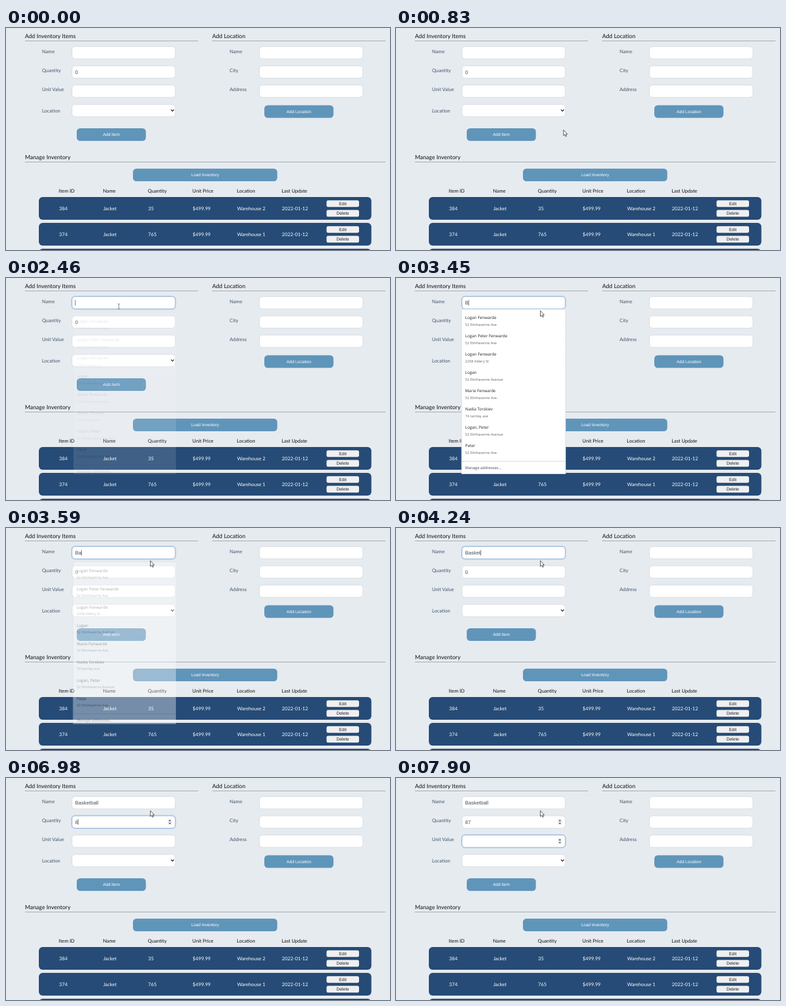
An HTML page for the animation above (8000 ms loop, 608x352 px).

```html
<!DOCTYPE html>
<html lang="en">
<head>
<meta charset="utf-8">
<title>Inventory form</title>
<style>
html, body { margin: 0; width: 100%; height: 100%; overflow: hidden; background: #e6ebf0; }
svg { display: block; text-rendering: geometricPrecision; }
text { font: 7.7px Lato, sans-serif; fill: #111; white-space: pre; }
.head { font-size: 9.05px; }
.label { fill: #45566a; }
.cell { fill: #fff; }
.value { font: 8px "Liberation Sans", Arial, sans-serif; fill: #454d55; }
.btn { font: 6.65px "Liberation Sans", Arial, sans-serif; fill: #fff; text-anchor: middle; }
.small { font: 6.9px "Liberation Sans", Arial, sans-serif; fill: #222; text-anchor: middle; }
.person { font: 6.4px "Open Sans", sans-serif; fill: #222; }
.street { font: 5.6px "Open Sans", sans-serif; fill: #666; }
.manage { font: 6px "Open Sans", sans-serif; fill: #444; }
</style>
</head>
<body>
<svg id="stage" width="608" height="352" viewBox="0 0 608 352"></svg>
<script>
const text = (cls, x, y, s, id = '') => `<text class="${cls}" x="${x}" y="${y}" id="${id}">${s}</text>`;
const box = (x, y, w, h, r, fill, more = '') =>
  `<rect x="${x}" y="${y}" width="${w}" height="${h}" rx="${r}" fill="${fill}" ${more}/>`;
const rule = (x1, x2, y) => `<path d="M${x1} ${y}H${x2}" stroke="#a6abb0"/>`;
const field = (x, y, w) => box(x, y, w, 19.5, 5, '#fff', 'stroke="#d3d9df" stroke-width=".8"');
const button = (x, y, w, s) => box(x, y, w, 20, 5.5, '#6095ba') + text('btn', x + w / 2, y + 12.4, s);
const small = (y, s) => box(507.5, y, 51.5, 10.6, 2.8, '#f0f0f0') + text('small', 533.2, y + 7.6, s);
const spinner = (id, y) => `<g id="${id}">` + box(256, y - 5, 7, 10, 0, '#f0f0f0') +
  `<path d="M257.4 ${y - 1.2}l2-2.4 2 2.4zM257.4 ${y + 1.2}l2 2.4 2-2.4z" fill="#555"/></g>`;

const rowY = [29.4, 60, 90.5, 121.2];
const columns = [84, 154, 225, 295.5, 366, 436.8];

function row(y, cells) {
  return box(52, y, 526.5, 36, 6, '#264b76') +
    cells.map((s, i) => text('cell', columns[i], y + 21, s)).join('') +
    small(y + 5.2, 'Edit') + small(y + 20.6, 'Delete');
}

function form(x, names, fieldX, w, labelY) {
  return names.map((s, i) => text('label', x, labelY[i], s) + field(fieldX, rowY[i], w)).join('');
}

const people = [
  ['Logan Fenwarde', '52 Elmhaverne Ave'],
  ['Logan Peter Fenwarde', '52 Elmhaverne Ave'],
  ['Logan Fenwarde', '2208 Aldery St'],
  ['Logan', '52 Elmhaverne Avenue'],
  ['Marie Fenwarde', '52 Elmhaverne Ave.'],
  ['Nadia Torskiev', '74 tarnley ave'],
  ['Logan, Peter', '52 Elmhaverne Avenue'],
  ['Peter', '52 Elmhaverne Ave.']
];

const popup = `<svg x="103" y="49.5" width="166" height="261.5" viewBox="103 49.5 166 261.5"><g id="popup">` +
  box(103.9, 49.5, 164.6, 261, 0, '#fff', 'stroke="#d5dae0" stroke-width=".8"') +
  people.map(([name, street], i) =>
    text('person', 109.6, 65.4 + 29 * i, name) + text('street', 109.6, 76 + 29 * i, street)).join('') +
  '<path d="M104 290.5H268.5" stroke="#d5dbe3"/>' +
  text('manage', 109.6, 302.8, 'Manage addresses...') + '</g></svg>';

const stage = document.getElementById('stage');
stage.innerHTML = box(0, 0, 608, 352, 0, '#e6ebf0') +
  text('head', 30, 15.5, 'Add Inventory Items') + rule(30, 304, 20.5) +
  text('head', 326.5, 15.5, 'Add Location') + rule(326.5, 601, 20.5) +
  form(57, ['Name', 'Quantity', 'Unit Value', 'Location'], 104.5, 163.5, [39.5, 69.6, 100.1, 133.5]) +
  form(354, ['Name', 'City', 'Address'], 401.3, 163.8, [39.5, 69.6, 100.1]) +
  '<path d="M261.3 129.4l2.3 2.4 2.3-2.4" fill="none" stroke="#111" stroke-width="1.2"/>' +
  button(112, 159, 109.5, 'Add Item') + button(409, 122.5, 109.5, 'Add Location') +
  text('head', 30, 207.5, 'Manage Inventory') + rule(30, 601, 212.5) +
  button(201, 223, 228.5, 'Load Inventory') +
  ['Item ID', 'Name', 'Quantity', 'Unit Price', 'Location', 'Last Update']
    .map((s, i) => text('', columns[i] - .4, 261.3, s)).join('') +
  row(268, ['384', 'Jacket', '35', '$499.99', 'Warehouse 2', '2022-01-12']) +
  row(309, ['374', 'Jacket', '765', '$499.99', 'Warehouse 1', '2022-01-12']) +
  box(52, 350, 526.5, 36, 6, '#264b76') +
  '<g id="ring">' + box(103.8, 28.7, 164.9, 20.9, 5.7, 'none', 'stroke="#c3d6e9" stroke-width="1.6"') +
  box(104.5, 29.4, 163.5, 19.5, 5, '#fff', 'stroke="#93b4d6" stroke-width=".9"') + '</g>' +
  spinner('spinQty', 69.7) + spinner('spinUnit', 100.2) +
  box(109.4, 65, 4.8, 9, 0, '#3390f0', 'id="mark"') +
  text('value', 109.5, 41.6, '', 'name') + text('value', 109.5, 72.5, '0', 'qty') +
  '<path id="caret" stroke="#555" stroke-width=".8" d="M0 0v9"/>' +
  popup +
  '<path id="arrow" d="M0 0V9.2L2.1 7.3 3.5 10.4 4.9 9.8 3.6 6.8H6.2Z" fill="#fff" stroke="#333" stroke-width=".8"/>' +
  '<path id="beam" d="M-1.8-4H-.5L0-3.5.5-4H1.8M0-3.5V3.5M-1.8 4H-.5L0 3.5.5 4H1.8" fill="none" stroke="#666" stroke-width=".8"/>';

const el = id => document.getElementById(id);
const show = (id, on) => el(id).setAttribute('visibility', on ? 'visible' : 'hidden');
const move = (id, x, y) => el(id).setAttribute('transform', `translate(${x} ${y})`);
const ramp = (t, a, b) => Math.min(1, Math.max(0, (t - a) / (b - a)));

// time, x, y of the pointer
const path = [
  [510, 583, 344], [830, 265.5, 161.8], [1300, 116, 41], [1370, 121, 40], [1510, 149, 40],
  [1770, 150, 40.5], [1970, 160, 42.5], [2390, 160, 42.5], [2650, 228.6, 51.8]
];
const keys = [3450, 3590, 3720, 4040, 4170, 4240, 4570, 4710, 5240, 5370];
const FOCUS = 2170, TO_QTY = 5500, TO_UNIT = 7370;

function pointer(t) {
  const i = path.findIndex(p => p[0] > t);
  if (i < 0) return path[path.length - 1].slice(1);
  const [a, b] = [path[i - 1], path[i]], k = ramp(t, a[0], b[0]);
  return [a[1] + (b[1] - a[1]) * k, a[2] + (b[2] - a[2]) * k];
}

function drawPointer(t) {
  if (t < 510) { show('arrow', false); show('beam', false); return; }
  const [x, y] = pointer(t);
  const over = x > 104 && x < 268 && rowY.slice(0, 3).some(top => y > top && y < top + 19.5);
  show('arrow', !over);
  show('beam', over);
  move(over ? 'beam' : 'arrow', x, y);
}

function draw(t) {
  const focus = t < FOCUS ? -1 : t < TO_QTY ? 0 : t < TO_UNIT ? 1 : 2;
  const typed = keys.filter(k => k <= t).length;
  el('name').textContent = 'Basketball'.slice(0, typed);

  const selected = focus === 1 && t < 6980;
  el('qty').textContent = t < 6980 ? '0' : t < 7100 ? '8' : '87';
  el('qty').style.fill = selected ? '#fff' : '';
  show('mark', selected);
  show('spinQty', focus > 0);
  show('spinUnit', focus === 2);

  show('ring', focus >= 0);
  move('ring', 0, focus > 0 ? rowY[focus] - rowY[0] : 0);

  const blinkOff = t >= 2920 && t < 3450 || t >= 7900;
  show('caret', focus >= 0 && !selected && !blinkOff);
  const width = focus === 0 ? el('name').getComputedTextLength()
    : focus === 1 ? el('qty').getComputedTextLength() : 0;
  move('caret', 109.7 + width, [34.8, 65, 95.5][Math.max(0, focus)]);

  const alpha = ramp(t, 2440, 2620) * (1 - ramp(t, 3470, 3660));
  el('popup').setAttribute('opacity', alpha);
  move('popup', 3.6 * (1 - alpha), 6.8 * (1 - alpha));

  drawPointer(t);
}

const start = performance.now();
function tick() {
  draw((performance.now() - start) % 8000);
  requestAnimationFrame(tick);
}
tick();
</script>
</body>
</html>
```
